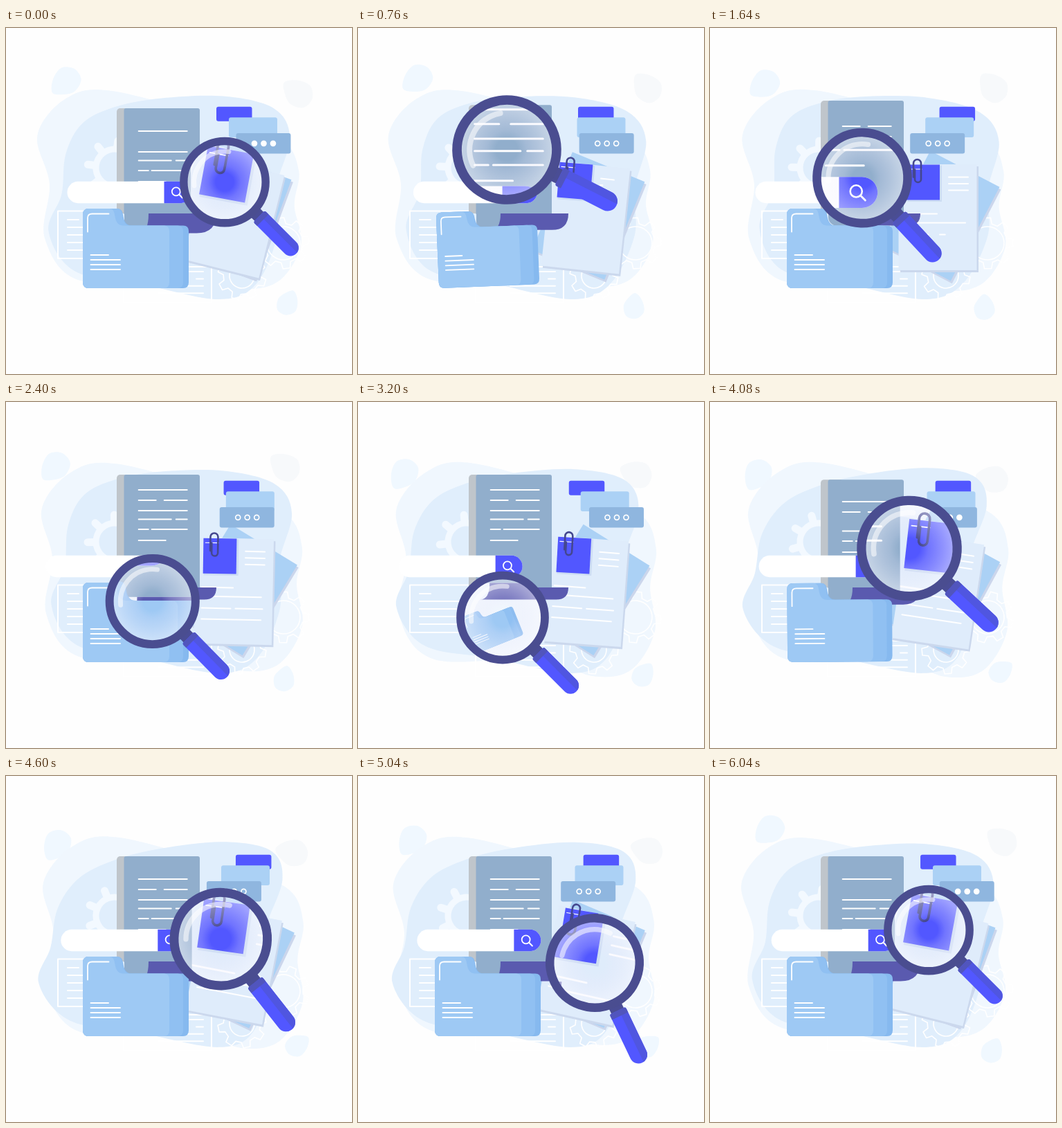
These frames come from a looping animation (500x500 px, 6080 ms). An HTML page with a canvas:

```html
<!DOCTYPE html>
<html lang="en">
<head>
<meta charset="utf-8">
<title>Search illustration</title>
<style>
  html, body { margin: 0; width: 100%; height: 100%; overflow: hidden; background: #fefefe; }
  canvas { display: block; width: 100vw; height: 100vh; }
</style>
</head>
<body>
<canvas id="stage"></canvas>
<script>
const LOOP = 6080, TAU = Math.PI * 2, RAD = Math.PI / 180, ZOOM = 1.43;
const canvas = document.getElementById('stage');
const c = canvas.getContext('2d');

// Timing helpers
const clamp = v => Math.min(1, Math.max(0, v));
const ease = v => { v = clamp(v); return v * v * (3 - 2 * v); };
const mix = (a, b, u) => a + (b - a) * u;
const wave = (t, peak, period = LOOP) => Math.cos(TAU * (t - peak) / period);
// Rises from 0 to 1 between a and b, stays, and falls back between d and e.
const swell = (t, a, b, d, e) => ease((t - a) / (b - a)) * (1 - ease((t - d) / (e - d)));

// The lens rests at each stop from arrive to leave and glides between them.
const stops = [
  { arrive: -340, leave: 100, x: 316, y: 222.6, r: 65, a: 45 },
  { arrive: 760, leave: 880, x: 215, y: 176, r: 79, a: 27 },
  { arrive: 1640, leave: 1860, x: 220, y: 216.6, r: 72, a: 47 },
  { arrive: 2660, leave: 3260, x: 209, y: 311.6, r: 67, a: 45 },
  { arrive: 4020, leave: 4300, x: 288, y: 211.5, r: 76, a: 43 },
  { arrive: 4980, leave: 5140, x: 342, y: 270, r: 71, a: 64.5 }
];
function lensAt(t) {
  const i = stops.findLastIndex(s => s.arrive <= t);
  const from = stops[i], to = stops[(i + 1) % stops.length];
  const end = to.arrive + (i + 1 === stops.length ? LOOP : 0);
  const u = ease((t - from.leave) / (end - from.leave));
  const at = k => mix(from[k], to[k], u);
  return { x: at('x'), y: at('y'), r: at('r'), a: at('a') };
}

// Shared motion
const lift = t => swell(t, 0, 1700, 3300, 4600);
const docTop = t => 116 - 11 * lift(t);
const textTop = t => 149 - 22 * lift(t) ** 1.4;
const paperTilt = t => 14 - 14 * swell(t, 0, 1400, 1640, 5900);
const sheetTilt = t => 26.2 + 6 * wave(t, 2950);
const barLeft = t => 73 + 16.5 * wave(t, 5740);
const gearTurn = t => 7 - 45 * t / LOOP + 5.5 * (1 - wave(t, 0));
const tucked = t => swell(t, 2500, 2900, 3260, 4150);
const nod = t => swell(t, 200, 760, 760, 1300);

// Each document line is wiped away around its gap time.
const docLines = [
  { y: 0, parts: [[0, 70]], gap: 1640 },
  { y: 15, parts: [[0, 25], [37, 70]], gap: 0 },
  { y: 30, parts: [[0, 70]], gap: 4080 },
  { y: 42.5, parts: [[0, 47], [54, 70]] },
  { y: 57, parts: [[0, 14], [19, 70]] },
  { y: 73, parts: [[0, 39]], gap: 5500 }
];
function written(t, gap) {
  if (gap === undefined) return 1;
  const d = Math.abs(t - gap);
  return ease((Math.min(d, LOOP - d) - 150) / 350);
}
const paperLines = [
  [16, 44, -58], [16, 44, -48.5], [16, 44, -39], [-46, -1, -5],
  [-46, 40, 8], [-46, -4, 25], [3, 42, 25], [-46, 40, 41]
];

// Drawing helpers
function box(x, y, w, h, r, fill) {
  c.beginPath();
  c.roundRect(x, y, w, h, r);
  c.fillStyle = fill;
  c.fill();
}
function line(points, width = 2, color = '#fff') {
  c.beginPath();
  points.forEach(([x, y]) => c.lineTo(x, y));
  c.lineWidth = width;
  c.strokeStyle = color;
  c.stroke();
}
function ring(x, y, r, width, color = '#fff') {
  c.beginPath();
  c.arc(x, y, r, 0, TAU);
  c.lineWidth = width;
  c.strokeStyle = color;
  c.stroke();
}
function place(x, y, deg, scale, draw) {
  c.save();
  c.translate(x, y);
  c.rotate(deg * RAD);
  c.scale(scale, scale);
  draw();
  c.restore();
}
function smooth(points, fill) {
  const n = points.length, p = i => points[(i + n) % n];
  c.beginPath();
  c.moveTo(...p(0));
  for (let i = 0; i < n; i++) {
    const [a, b, d, e] = [p(i - 1), p(i), p(i + 1), p(i + 2)];
    c.bezierCurveTo(b[0] + (d[0] - a[0]) / 6, b[1] + (d[1] - a[1]) / 6,
      d[0] - (e[0] - b[0]) / 6, d[1] - (e[1] - b[1]) / 6, ...d);
  }
  c.fillStyle = fill;
  c.fill();
}

// Backdrop
const PALE = [[44, 155], [85, 102], [150, 91], [300, 130], [395, 160], [422, 205], [416, 255],
  [426, 310], [395, 362], [340, 374], [260, 355], [110, 365], [56, 305], [62, 225]];
const DEEP = [[95, 175], [115, 130], [160, 108], [225, 99], [315, 101], [390, 122], [418, 165],
  [402, 235], [402, 300], [365, 370], [308, 392], [200, 370], [105, 350], [72, 290], [92, 235]];
const DROP = [[1.25, 0.15], [0.55, 0.75], [-0.4, 0.88], [-0.98, 0.2], [-0.78, -0.65], [0.1, -0.9], [0.8, -0.5]];

function drop(x, y, deg, r, color) {
  place(x, y, deg, r, () => smooth(DROP, color));
}
function blobs(t) {
  const turn = wave(t, 4450), sky = '#f0f8ff';
  drop(77.5 + 10.5 * wave(t, 340), 89 + 16 * wave(t, 3700), 127 + 13 * wave(t, 1000), 21, sky);
  drop(413 + 10 * wave(t, 5900), 99 + 13 * wave(t, 4250), 205 - 20 * wave(t, 4250), 21, '#f7f9fb');
  drop(408 + 12 * turn, 397.5 - 8 * turn, -68 + 28 * turn, 16.5, sky);

  const drift = 0.5 + 0.5 * wave(t, 3700);
  smooth(PALE.map(([x, y]) => [
    x + drift * 16 * (1 - (y - 90) / 280),
    y + drift * (y - 150) * x / 3200
  ]), '#f0f7fe');

  const bend = 0.5 + 0.5 * wave(t, 4400);
  smooth(DEEP.map(([x, y]) => [
    x - bend * 28 * Math.sin(Math.PI * (y - 95) / 300),
    y - bend * 0.13 * (x - 270) * (1 - (y - 100) / 300)
  ]), '#e0eefc');
}

function outlineGear(x, y, size, hole, turn) {
  place(x, y, turn, 1, () => {
    c.beginPath();
    for (let i = 0; i < 8; i++) {
      const a = i * TAU / 8;
      for (const [r, d] of [[0.77, -0.24], [1, -0.14], [1, 0.14], [0.77, 0.24]])
        c.lineTo(Math.cos(a + d) * size * r, Math.sin(a + d) * size * r);
    }
    c.closePath();
    c.lineWidth = 1.6;
    c.strokeStyle = '#fff';
    c.stroke();
    ring(0, 0, hole, 1.6);
  });
}
function solidGear(turn) {
  place(157, 202, turn, 1, () => {
    ring(0, 0, 27, 9, '#f3f9ff');
    for (let i = 0; i < 8; i++) {
      const x = Math.cos(i * TAU / 8), y = Math.sin(i * TAU / 8);
      line([[x * 29, y * 29], [x * 39, y * 39]], 11, '#f3f9ff');
    }
  });
}
function tables() {
  c.lineWidth = 2;
  c.strokeStyle = '#fff';
  c.strokeRect(75, 264.5, 129, 68.5);
  c.strokeRect(170, 345, 127, 52);
  for (let i = 0; i < 5; i++)
    line([[89, 277 + i * 11], [i ? 170 : 105, 277 + i * 11]]);
  for (let i = 0; i < 4; i++)
    line([[i === 1 ? 275 : 220, 352 + i * 10.4], [285, 352 + i * 10.4]]);
}

// Objects
function docText(t, x, y, k) {
  for (const row of docLines) {
    const end = written(t, row.gap) * 70;
    for (const [a, b] of row.parts) {
      const e = Math.min(b, end);
      if (e > a) line([[x + a * k, y + row.y * k], [x + e * k, y + row.y * k]], k > 1 ? 3 : 2);
    }
  }
}
function scrollBase(left, right, y, h) {
  c.beginPath();
  c.moveTo(left, y);
  c.lineTo(right, y);
  c.quadraticCurveTo(right, y + h, right - h, y + h);
  c.lineTo(left - 14, y + h);
  c.quadraticCurveTo(left, y + h, left, y);
  c.fillStyle = '#5a5aaf';
  c.fill();
}
function documentSheet(t) {
  const top = docTop(t), h = top - 87.5;
  box(160, top, 30, 268 - top, [5, 0, 0, 0], '#bfc5cb');
  box(170.5, top, 109.5, 269 - top, [3, 3, 0, 0], '#91aecc');
  box(171, 250, 42, 18 + h, [0, 0, 6, 12], '#91aecc');
  scrollBase(206, 304, 268, h);
  docText(t, 191.7, textTop(t), 1);
}

function bubbles(t) {
  const sway = wave(t, 1520, LOOP / 2);
  const x = 311.5 - 22.5 * wave(t, 1700, LOOP / 2);
  box(318 + 14 * sway, 113.7, 51.5, 21, 3, '#5257ff');
  box(316.5 - 5.5 * sway, 129.2, 70, 28.8, 3, '#abd1f5');
  box(x, 152, 79, 29.5, 3, '#8fb6df');
  for (let i = 0; i < 3; i++) {
    ring(x + 26.5 + i * 13.5, 166.8, 3.5, 1.7);
    c.globalAlpha = clamp(2 * wave(t, 0, LOOP / 3) - 0.9);
    c.fillStyle = '#fff';
    c.fill();
    c.globalAlpha = 1;
  }
}

function paperclip() {
  c.beginPath();
  c.moveTo(-5.5, 9);
  c.lineTo(-5.5, -11);
  c.arc(0, -11, 5.5, Math.PI, 0);
  c.lineTo(5.5, 12);
  c.arc(1, 12, 4.5, 0, Math.PI);
  c.lineTo(-3.5, -2);
  c.lineWidth = 2.6;
  c.strokeStyle = '#44478f';
  c.stroke();
}
function note() {
  box(-23, -24.5, 50, 52.5, 0, '#cdddf3');
  box(-24, -25.5, 48, 51, 0, '#5257ff');
  line([[-21, -19], [-2, -19]], 1.2);
  place(-8.5, -16.5, 0, 1, paperclip);
}
function papers(t, x, y, k) {
  const tilt = paperTilt(t);
  place(x + 4 * k, y - 2 * k, sheetTilt(t), k, () => {
    box(-53, -74, 113, 153, 0, '#cbd6ec');
    box(-56.5, -76.5, 113, 153, 0, '#abd1f5');
  });
  place(x, y, tilt, k, () => {
    box(-54, -73.5, 113, 153, 0, '#cbd8ed');
    box(-56.5, -76.5, 113, 153, 0, '#dfecfb');
    paperLines.forEach(([a, b, ly], i) => {
      const grow = ease((t - 500 - i * 170) / 420);
      const wipe = ease((t - 5250 - i * 40) / 400);
      if (grow > wipe) line([[mix(a, b, wipe), ly], [mix(a, b, grow), ly]]);
    });
    place(-21, -50.5, -tilt / 4, 1, note);
  });
}

function searchBar(left, mid, k) {
  place(left, mid, 0, k, () => {
    box(0, -15.7, 179, 31.4, 15.7, '#fff');
    box(140, -15.7, 39, 31.4, [0, 15.7, 15.7, 0], '#5257ff');
    ring(157.3, -1.2, 6, 1.8);
    line([[161.8, 3.3], [166.5, 8]], 2);
  });
}

function folderPanel(tab, right, fill) {
  c.beginPath();
  c.moveTo(-76.5, -49);
  c.quadraticCurveTo(-76.5, -57.5, -68, -57.5);
  c.lineTo(tab, -57.5);
  c.quadraticCurveTo(tab + 7, -57.5, tab + 8, -46);
  c.quadraticCurveTo(tab + 10, -33, tab + 20, -33);
  c.lineTo(right - 8, -33);
  c.quadraticCurveTo(right, -33, right, -25);
  c.lineTo(right, 49);
  c.quadraticCurveTo(right, 57.5, right - 8, 57.5);
  c.lineTo(-68, 57.5);
  c.quadraticCurveTo(-76.5, 57.5, -76.5, 49);
  c.fillStyle = fill;
  c.fill();
}
function folder(t, x, y, k) {
  const tilt = -22 * tucked(t) - 2.3 * nod(t);
  const size = 1 - 0.56 * tucked(t) - 0.05 * nod(t);
  place(x, y, tilt, size * k, () => {
    folderPanel(-26, 76.5, '#86b9ef');
    folderPanel(-27, 68.5, '#90c0f2');
    folderPanel(-38, 48.5, '#9ec9f4');
    c.beginPath();
    c.moveTo(-69.5, -24);
    c.lineTo(-69.5, -44);
    c.quadraticCurveTo(-69.5, -50, -63, -50);
    c.lineTo(-39, -50);
    c.lineWidth = 1.8;
    c.strokeStyle = '#fff';
    c.stroke();
    for (let i = 0; i < 4; i++)
      line([[-65, 9.5 + i * 7], [i ? -22.5 : -39.5, 9.5 + i * 7]], 1.9);
  });
}

// The enlarged copy of the scene, spread out from a pivot that follows the lens.
function zoomed(t, lens) {
  const px = 111 + 0.63 * lens.x;
  const py = 200 + 2 * Math.max(0, lens.y - 270);
  const zx = x => px + ZOOM * (x - px), zy = y => py + ZOOM * (y - py);
  c.fillStyle = '#f0f6fd';
  c.fillRect(0, 0, 500, 500);
  papers(t, Math.max(330, 500 - 0.56 * px), 294 + 0.4 * (lens.y - 240), 1.4);
  box(zx(160), 0, zx(280) - zx(160), zy(268), 0, '#91aecc');
  scrollBase(zx(206), zx(304), zy(268), 24);
  docText(t, zx(192), zy(textTop(t)), 1.41);
  searchBar(zx(barLeft(t)), 237.5 + 0.33 * (217 - lens.y), ZOOM);
  folder(t, 194, 324, 1.12);
}

function magnifier(t) {
  const lens = lensAt(t), { x, y, r, a } = lens;
  c.save();
  c.beginPath();
  c.arc(x, y, r * 0.9, 0, TAU);
  c.clip();
  zoomed(t, lens);
  const haze = c.createRadialGradient(x, y, r * 0.2, x, y, r * 0.86);
  haze.addColorStop(0, 'rgba(236,234,252,0)');
  haze.addColorStop(0.25, 'rgba(236,234,252,0.2)');
  haze.addColorStop(1, 'rgba(250,250,255,0.52)');
  c.fillStyle = haze;
  c.fillRect(x - r, y - r, 2 * r, 2 * r);
  c.restore();

  place(x, y, a, r, () => {
    c.beginPath();
    c.arc(0, 0, 0.68, 128 * RAD, 233 * RAD);
    c.lineWidth = 0.1;
    c.strokeStyle = 'rgba(255,255,255,0.55)';
    c.stroke();

    box(0.96, -0.14, 0.2, 0.28, 0, '#4a4d94');
    c.save();
    c.beginPath();
    c.roundRect(1.08, -0.18, 1.17, 0.36, [0.04, 0.18, 0.18, 0.04]);
    c.clip();
    c.fillStyle = '#5257ff';
    c.fillRect(1, -0.2, 1.3, 0.4);
    c.fillStyle = '#5056e0';
    c.fillRect(1, -0.2, 1.3, 0.17);
    c.fillStyle = '#5155bd';
    c.fillRect(1, -0.2, 0.2, 0.4);
    c.restore();
    ring(0, 0, 0.91, 0.175, '#4a4d90');
  });
}

function render(t) {
  const dpr = window.devicePixelRatio || 1;
  const w = Math.round(innerWidth * dpr), h = Math.round(innerHeight * dpr);
  if (canvas.width !== w || canvas.height !== h) {
    canvas.width = w;
    canvas.height = h;
  }
  c.setTransform(w / 500, 0, 0, h / 500, 0, 0);
  c.fillStyle = '#fefefe';
  c.fillRect(0, 0, 500, 500);
  c.lineCap = 'round';
  c.lineJoin = 'round';
  blobs(t);
  solidGear(gearTurn(t));
  outlineGear(341, 358, 35, 18, gearTurn(t) + 10);
  outlineGear(401, 311, 37, 24, -gearTurn(t));
  tables();
  papers(t, 329, 273.5, 1);
  bubbles(t);
  documentSheet(t);
  searchBar(barLeft(t), 237.5, 1);
  folder(t, 187.5, 318.5, 1);
  magnifier(t);
}

const start = performance.now();
function frame() {
  const t = (performance.now() - start) % LOOP;
  render(Math.floor(t / 40) * 40);
  requestAnimationFrame(frame);
}
frame();
</script>
</body>
</html>
```
